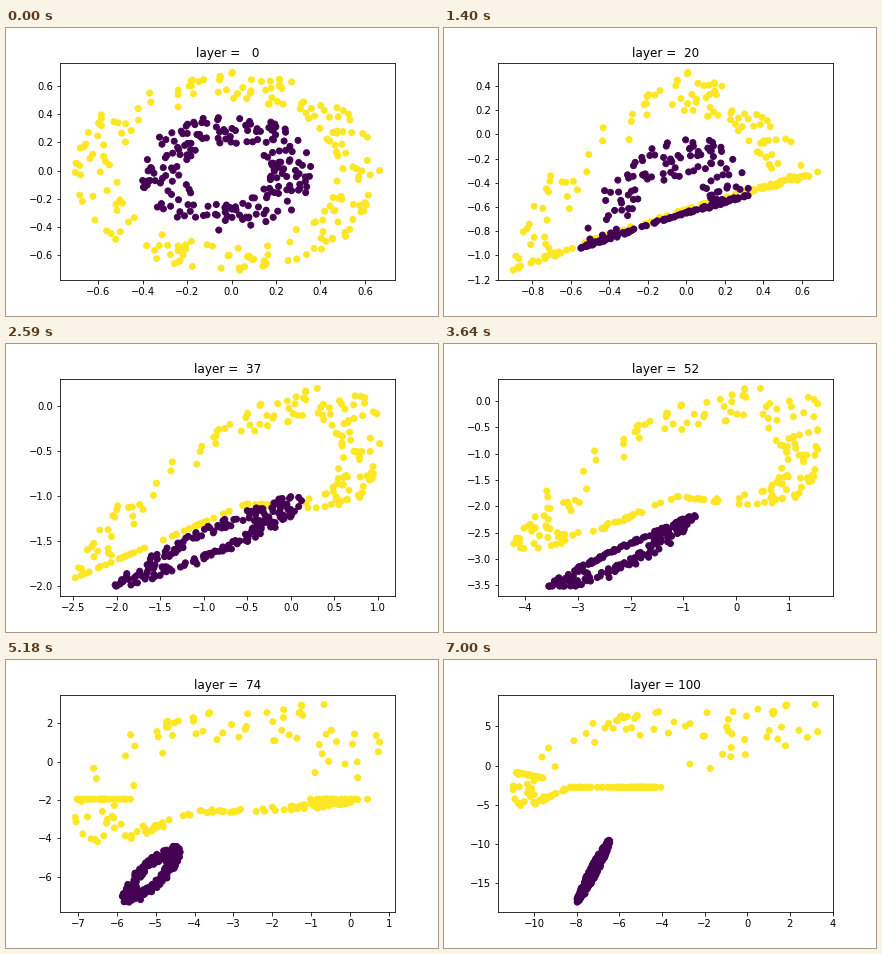
Write a matplotlib script that moves like this. It is 432 px wide and 288 px high and loops after 7.07 s.

```python
import numpy as np
import matplotlib.pyplot as plt
from matplotlib.animation import FuncAnimation

plt.rcParams["font.family"] = "DejaVu Sans"

FRAMES, INTERVAL = 101, 70
COUNT = 200
MARGIN = 1 / 22  # 5 % of the data on each side, as a share of the axis
YELLOW, PURPLE = "#fde725", "#440154"

rng = np.random.default_rng(12)


def ring(inner, outer):
    angle = rng.uniform(0, 2 * np.pi, COUNT)
    r = rng.uniform(inner, outer, COUNT)
    return r * np.cos(angle), r * np.sin(angle)


def parts(x, y):
    """Left, right, upper and lower parts of the coordinates."""
    return (np.minimum(x, 0), np.maximum(x, 0),
            np.maximum(y, 0), np.minimum(y, 0))


def fold(x, y):
    """Flatten the lower half onto a slanted line."""
    _, right, up, down = parts(x, y)
    return (1.16 * x - 0.11 + 0.15 * up - 0.75 * right * up,
            0.57 * x - 0.74 + 1.8 * up - 0.9 * right * up - 0.08 * down)


def shear_outer(x, y):
    """Lift the flattened side over the inner ring."""
    _, right, up, down = parts(x, y)
    return (2.6 * x - 0.65 + 0.5 * up - 0.4 * down,
            1.05 * x - 1.2 + 1.7 * up - 0.15 * down + 2 * right * down)


def shear_inner(x, y):
    _, _, up, down = parts(x, y)
    return (2.8 * x - 0.9 + 0.9 * up,
            1.05 * x - 1.58 + 0.9 * up + 0.4 * down)


def unroll_outer(x, y, k):
    """Flat line on the right, stretched arch on top, cluster on the left."""
    left, right, _, down = parts(x, y)
    lift = np.sqrt(np.maximum(y - 0.35, 0))
    return (0.455 - 0.18 * k + (0.68 - 0.27 * k) * x + (0.5 * k - 0.13) * lift
            + (1.3 + 2.5 * k) * lift * right + 0.13 * down,
            0.54 + 0.1 * k - 0.12 * k * left + 0.72 * lift
            + 0.6 * lift * right - 0.7 * left * down + 0.1 * (1 - k) * down)


def unroll_inner(x, y, k):
    return (0.225 + 0.07 * k + (0.23 - 0.08 * k) * x + 0.07 * y,
            0.167 + (0.2 + 0.13 * k) * x + 0.29 * y)


def fit(a, b):
    """Join both rings and scale them to the unit square."""
    p = np.hstack([a, b]).T
    low, high = p.min(axis=0), p.max(axis=0)
    return (p - low) / (high - low)


outer, inner = ring(0.5, 0.7), ring(0.2, 0.4)

shapes = {
    0: fit(outer, inner),
    20: fit(fold(*outer), fold(*inner)),
    37: fit(shear_outer(*outer), shear_inner(*inner)),
    74: fit(unroll_outer(*outer, 0), unroll_inner(*inner, 0)),
    100: fit(unroll_outer(*outer, 1), unroll_inner(*inner, 1)),
}

# Axis limits: left, right, bottom, top
limits = {
    0: (-0.771, 0.734, -0.777, 0.766),
    20: (-0.979, 0.760, -1.203, 0.593),
    37: (-2.65, 1.193, -2.11, 0.305),
    52: (-4.51, 1.83, -3.70, 0.425),
    74: (-7.46, 1.15, -7.83, 3.5),
    84: (-9.05, 1.62, -11.1, 5.56),
    100: (-11.69, 4.01, -18.7, 9.08),
}


def glide(stages):
    """Return a smooth function of the layer that meets every stage."""
    at = np.array(list(stages), float)
    values = np.array(list(stages.values()))
    slopes = np.gradient(values, at, axis=0)

    def value(layer):
        i = min(np.searchsorted(at, layer, side="right"), len(at) - 1) - 1
        h = at[i + 1] - at[i]
        t = (layer - at[i]) / h
        ease = t * t * (3 - 2 * t)
        return (values[i] * (1 - ease) + values[i + 1] * ease
                + h * t * (1 - t) * ((1 - t) * slopes[i] - t * slopes[i + 1]))

    return value


shape_at, limits_at = glide(shapes), glide(limits)

fig, ax = plt.subplots(figsize=(6, 4), dpi=72)
fig.subplots_adjust(left=0.125, right=0.9, bottom=0.125, top=0.88)
dots = ax.scatter(*shapes[0].T, c=[YELLOW] * COUNT + [PURPLE] * COUNT)
title = ax.set_title("")


def draw(layer):
    x0, x1, y0, y1 = limits_at(layer)
    share = MARGIN + (1 - 2 * MARGIN) * np.clip(shape_at(layer), 0, 1)
    dots.set_offsets([x0, y0] + share * [x1 - x0, y1 - y0])
    ax.set_xlim(x0, x1)
    ax.set_ylim(y0, y1)
    title.set_text(f"layer = {layer:3d}")
    return dots, title


anim = FuncAnimation(fig, draw, frames=FRAMES, interval=INTERVAL, repeat=True)
plt.show()
```
